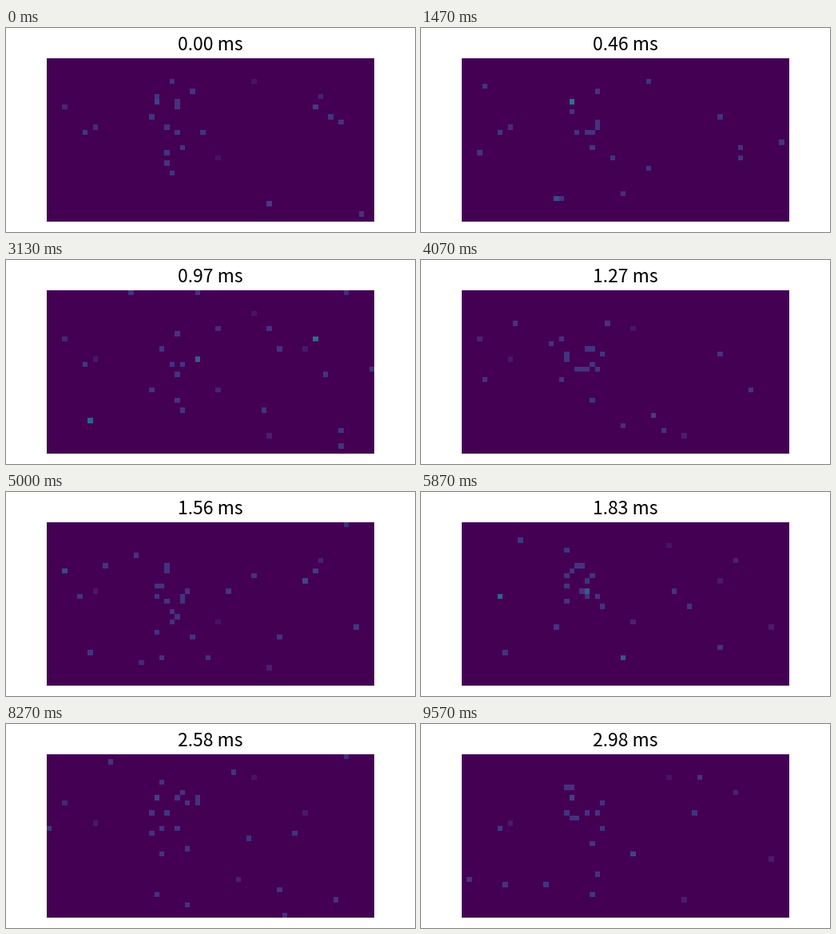
Animation of 512 by 256 pixels, one loop 9.6 s. Source, as a matplotlib script:

```python
import numpy as np
import matplotlib.pyplot as plt
from matplotlib.animation import FuncAnimation

DPI = 100
COLS, ROWS = 64, 32
FRAMES, LOOP_MS = 288, 9600
STEP = 2.982 / (FRAMES - 1)   # displayed ms per frame

HIT = 0.145                   # level of one hit on an ordinary pixel
SPOT = (23.3, 12.2)           # centre of the light spot (col, row)
SPREAD = (2.8, 4.2)

# noisy pixels fire often but count for less: a few fixed, the rest scattered
setup = np.random.default_rng(7)
noisy = [(33, 19), (40, 4), (33, 7), (9, 13), (50, 11)]
noisy += [(setup.integers(COLS), setup.integers(ROWS)) for _ in range(12)]
rates = 0.9 * 0.92 ** np.arange(len(noisy))
levels = 0.045 / rates


def hits(n):
    """Light levels of every pixel in frame n."""
    rng = np.random.default_rng(4100 + n)
    img = np.zeros((ROWS, COLS))

    for _ in range(rng.poisson(9)):
        col, row = np.rint(rng.normal(SPOT, SPREAD)).astype(int)
        if 0 <= col < COLS and 0 <= row < ROWS:
            img[row, col] += HIT

    for _ in range(rng.poisson(8)):
        img[rng.integers(ROWS), rng.integers(COLS)] += HIT

    for (col, row), rate, level in zip(noisy, rates, levels):
        img[row, col] = rng.poisson(rate) * level
    return img


fig = plt.figure(figsize=(512 / DPI, 256 / DPI), dpi=DPI, facecolor="white")
ax = fig.add_axes([0.1, 0.05, 0.8, 0.8])
ax.axis("off")
view = ax.imshow(hits(0), cmap="viridis", vmin=0, vmax=1,
                 interpolation="nearest", aspect="auto")
label = fig.text(0.5, 1 - 28 / 256, "", ha="center", va="baseline",
                 family="Noto Sans CJK JP", fontsize=23 * 72 / DPI, color="black")


def draw(n):
    view.set_data(hits(n))
    label.set_text(f"{n * STEP:.2f} ms")
    return view, label


anim = FuncAnimation(fig, draw, frames=FRAMES, interval=LOOP_MS / FRAMES,
                     init_func=lambda: draw(0), repeat=True, repeat_delay=0)
plt.show()
```
